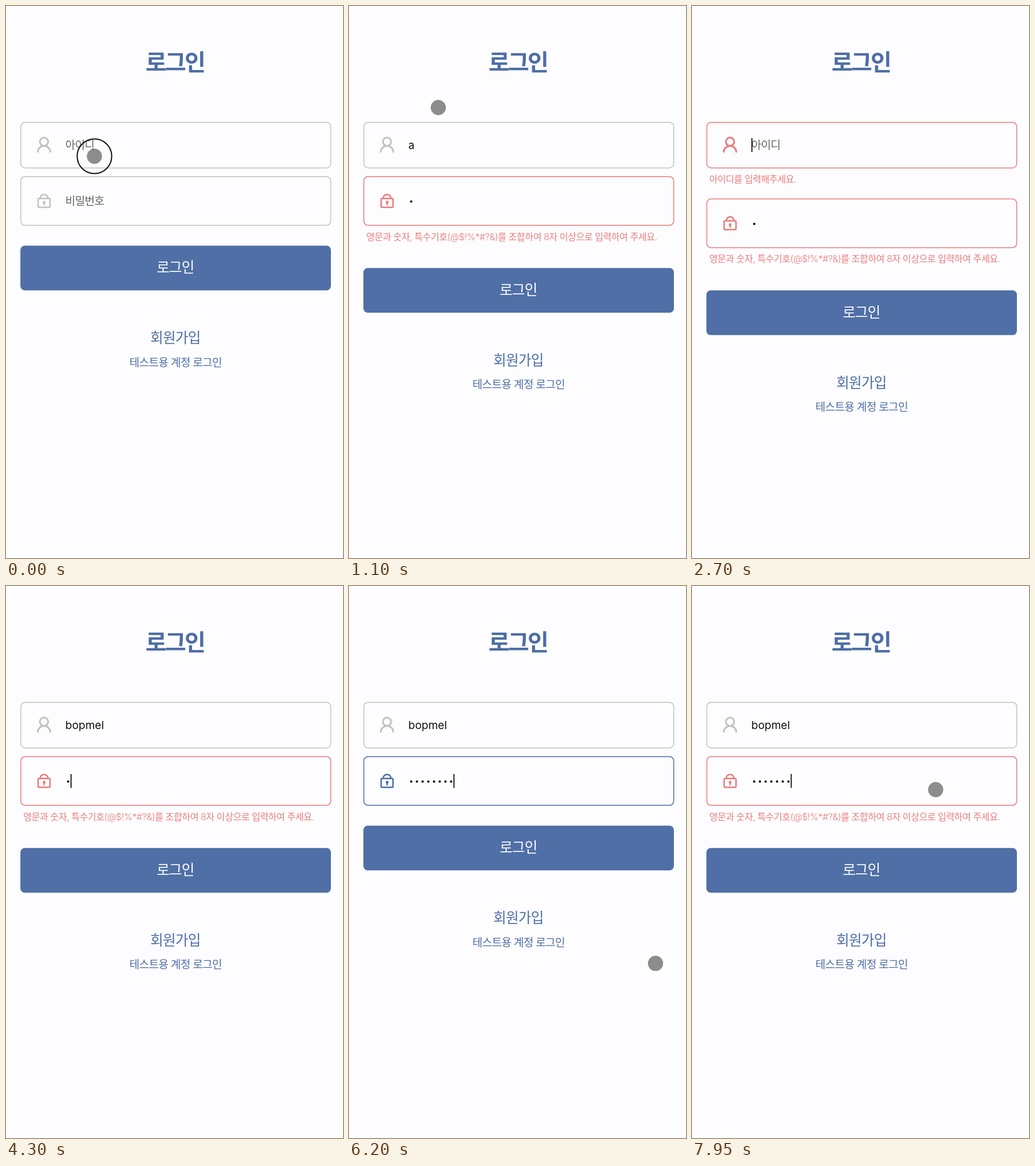
Write an HTML page that moves like this. It is 585 px wide and 957 px high and loops after 8 s.

```html
<!DOCTYPE html>
<html lang="ko">
<head>
<meta charset="utf-8">
<title>로그인</title>
<style>
  html, body { margin: 0; width: 100%; height: 100%; overflow: hidden; background: #fdfcfe; }
  svg { display: block; width: 100%; height: 100%; --blue: #4d6ea6; --gray: #c3c1c4; --red: #ea7c7c; }
  text { font-family: Inter, "Noto Sans CJK KR", "Noto Sans CJK", sans-serif; fill: var(--blue); white-space: pre; }
  .center { text-anchor: middle; }
  .title { font-size: 40px; font-weight: 800; letter-spacing: -3px; }
  .label { font-size: 24.5px; font-weight: 500; letter-spacing: -.8px; }
  .small { font-size: 19px; letter-spacing: -.7px; }
  .hint { fill: #666468; }
  .value { fill: #111; font-size: 19px; }
  .error { fill: var(--red); font-size: 16px; font-weight: 300; letter-spacing: -.45px; }
  .field { color: var(--gray); }
  .field.focus { color: var(--blue); }
  .field.bad { color: var(--red); }
  .field > rect, .icon { fill: none; stroke: currentColor; }
  .field > rect { stroke-width: 1.5; }
  .icon { stroke-width: 3; stroke-linecap: round; }
  .caret { stroke: #111; stroke-width: 1.8; }
</style>
</head>
<body>
<svg viewBox="0 0 585 957">
  <text class="title center" x="293" y="112">로그인</text>

  <g class="field" id="user">
    <rect x="25.7" y="201.7" width="538" height="79" rx="7.5"/>
    <g class="icon">
      <circle cx="66" cy="235.3" r="7.2"/>
      <path d="M55.2 252.8a10.8 10.2 0 0 1 21.6 0"/>
    </g>
    <text class="small hint" x="103" y="247.5">아이디</text>
    <text class="value" x="103" y="247.5"></text>
    <path class="caret" d="M104 229v24"/>
    <text class="error" x="30" y="305.5">아이디를 입력해주세요.</text>
  </g>

  <g id="lower">
    <g class="field" id="pass">
      <rect x="25.7" y="295.7" width="538" height="84.6" rx="7.5"/>
      <g class="icon" style="stroke-width:2.5">
        <rect x="55.8" y="333.8" width="20.6" height="15.2" rx="1.5"/>
        <path d="M59.3 333.5a6.8 6.8 0 0 1 13.6 0M66.2 341v3.5"/>
        <circle cx="66.2" cy="340.3" r="1.2"/>
      </g>
      <text class="small hint" x="103" y="344.5">비밀번호</text>
      <g class="dots"></g>
      <path class="caret" d="M103 326v24"/>
      <text class="error" x="30" y="405.5">영문과 숫자, 특수기호(@$!%*#?&amp;)를 조합하여 8자 이상으로 입력하여 주세요.</text>
    </g>
    <g id="actions">
      <rect x="25" y="415.5" width="539" height="77.5" rx="7.5" fill="#4f6fa6"/>
      <text class="label center" x="294" y="462" style="fill:#fff">로그인</text>
      <text class="label center" x="294" y="584">회원가입</text>
      <text class="small center" x="294.5" y="624.5">테스트용 계정 로그인</text>
    </g>
  </g>

  <g id="pointer">
    <circle r="14.5" fill="none" stroke="#fff" stroke-opacity=".5" stroke-width="3"/>
    <circle r="13.2" fill-opacity=".44"/>
    <circle id="ring" r="30" fill="none" stroke="#111" stroke-width="2"/>
  </g>
</svg>
<script>
const LOOP = 8000, SHIFT = 38.8, DOT_STEP = 9.9, NAME = 'bopmel';
const $ = (selector, root = document) => root.querySelector(selector);
const show = (el, on) => el.style.display = on ? '' : 'none';
const moveTo = (el, x, y) => el.setAttribute('transform', `translate(${x} ${y})`);
const user = $('#user'), pass = $('#pass'), pointer = $('#pointer'), dots = $('.dots');

dots.innerHTML = Array.from({ length: 8 }, (_, i) =>
  `<circle cx="${108 + i * DOT_STEP}" cy="339" r="2.1" fill="#111"/>`).join('');

// Each step changes part of the form and restarts the caret blink.
const steps = [
  { at: 0, focus: '', name: '', count: 0, userBad: false, passBad: false },
  { at: 50, focus: 'user' },
  { at: 250, name: 'a' },
  { at: 420, focus: 'pass' },
  { at: 580, count: 1, passBad: true },
  { at: 1750, focus: 'user' },
  { at: 2400, name: '', userBad: true },
  ...[...NAME].map((_, i) => ({ at: 3500 + i * 90, name: NAME.slice(0, i + 1), userBad: false })),
  { at: 4290, focus: 'pass' },
  ...Array.from({ length: 7 }, (_, i) => ({ at: 4530 + i * 75, count: i + 2, passBad: i < 6 })),
  { at: 6600, count: 7, passBad: true }
];

// Pointer trips: [time, x, y]; it hides between trips while keys are pressed.
const trips = [
  [[0, 153.5, 260.5], [250, 153.5, 260.5]],
  [[900, 153.5, 260.5], [1100, 155, 176], [1300, 156, 172], [1650, 160, 243], [2400, 160, 243]],
  [[5380, 215, 320], [5450, 310, 419], [5800, 440, 733], [6000, 490, 715], [6220, 533, 653],
   [6950, 536, 654], [7050, 536, 654], [7100, 549, 673], [7150, 546, 655], [7330, 546, 655], [7950, 423, 353], [8000, 421, 348]]
];
const clicks = [[0, 100], [1750, 1850]];
const within = (t, [from, to]) => t >= from && t < to;

function drawField(el, focused, bad, empty, caretX, caretOn) {
  el.classList.toggle('focus', focused);
  el.classList.toggle('bad', bad);
  show($('.hint', el), empty);
  show($('.error', el), bad);
  show($('.caret', el), focused && caretOn);
  moveTo($('.caret', el), caretX, 0);
}

function drawPointer(t) {
  const trip = trips.find(p => within(t, [p[0][0], p[p.length - 1][0]]));
  show(pointer, trip);
  if (!trip) return;
  const i = trip.findIndex(p => p[0] > t);
  const [t0, x0, y0] = trip[i - 1], [t1, x1, y1] = trip[i];
  const k = (t - t0) / (t1 - t0), ease = k * k * (3 - 2 * k);
  moveTo(pointer, x0 + (x1 - x0) * ease, y0 + (y1 - y0) * ease);
  show($('#ring'), clicks.some(c => within(t, c)));
}

function draw(t) {
  const form = Object.assign({}, ...steps.filter(s => s.at <= t));
  const caretOn = (t - form.at) % 1000 < 510;
  const value = $('.value', user);
  value.textContent = form.name;
  const nameWidth = form.name ? value.getComputedTextLength() : 0;
  drawField(user, form.focus === 'user', form.userBad, !form.name, nameWidth, caretOn);
  drawField(pass, form.focus === 'pass', form.passBad, !form.count, form.count * DOT_STEP, caretOn);
  [...dots.children].forEach((dot, i) => show(dot, i < form.count));
  moveTo($('#lower'), 0, form.userBad ? SHIFT : 0);
  moveTo($('#actions'), 0, form.passBad ? SHIFT : 0);
  drawPointer(t);
}

const start = performance.now();
(function tick() {
  draw((performance.now() - start) % LOOP);
  requestAnimationFrame(tick);
})();
</script>
</body>
</html>
```
